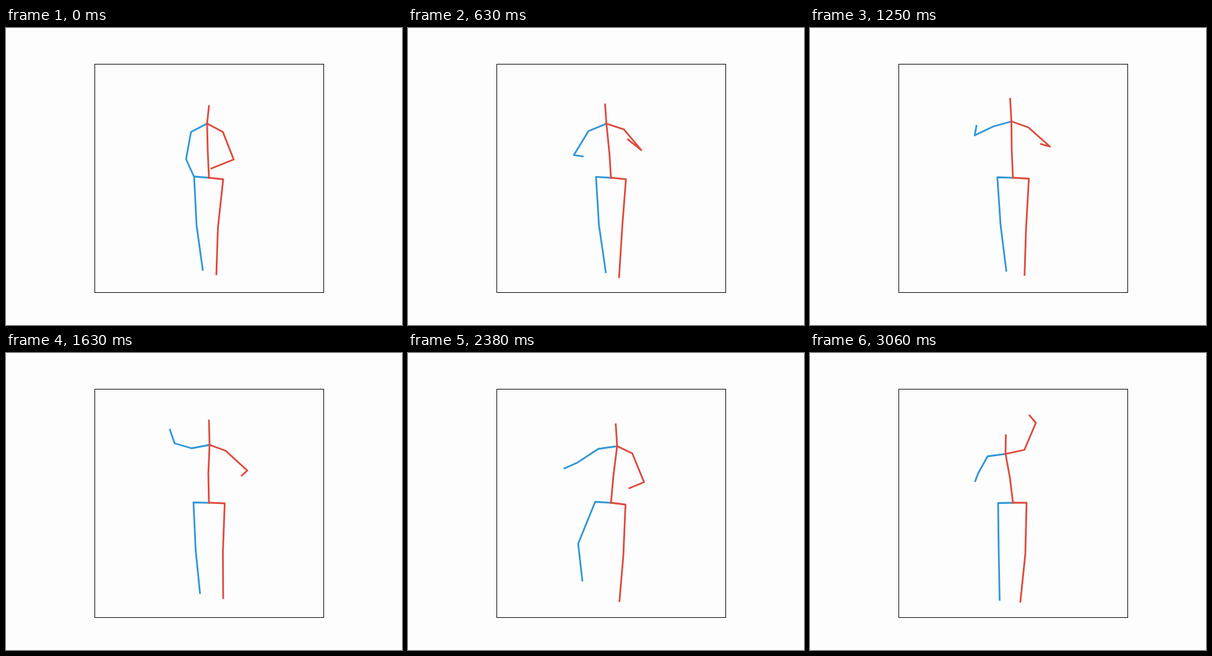
An HTML page for the animation above (3.12 s loop, 640 by 480 pixels).

```html
<!DOCTYPE html>
<html lang="en">
<head>
<meta charset="utf-8">
<title>Stick figure motion</title>
<style>
html, body { margin: 0; width: 100%; height: 100%; overflow: hidden; background: #fdfdfd; }
svg { display: block; width: 640px; height: 480px; }
.frame { fill: none; stroke: #000; stroke-width: 1; shape-rendering: crispEdges; }
.limb {
  fill: none; stroke-width: 2.8; stroke-linecap: square; stroke-linejoin: round;
  /* 50 poses per loop: each segment below steps once per pose */
  animation: 3120ms -4ms infinite;
}
.right { stroke: #3296d6; }
.left { stroke: #de4a3c; }
#trunk { animation-name: trunk; }
#left-arm { animation-name: left-arm; }
#left-leg { animation-name: left-leg; }
#right-arm { animation-name: right-arm; }
#right-leg { animation-name: right-leg; }

/* pelvis, spine, neck, head */
@keyframes trunk {
  0% { d: path("M328 242L326 198L325 154.5L328 126"); animation-timing-function: steps(5); }
  10% { d: path("M328 242L326 203L319 156L318 128"); animation-timing-function: steps(9); }
  28% { d: path("M328 242L325 200L322 153.5L319 120"); animation-timing-function: steps(12); }
  52% { d: path("M328 242L327 195L329 148.5L328 109"); animation-timing-function: steps(7); }
  66% { d: path("M328 242L335 195L346.5 150L341.5 113.5"); animation-timing-function: steps(10); }
  86% { d: path("M328 242L329.5 197L329.5 151L330 117"); animation-timing-function: steps(6); }
  98%, 100% { d: path("M328 242L323 201L316 163L316.5 133"); }
}
/* neck, shoulder, elbow, wrist */
@keyframes left-arm {
  0% { d: path("M325 154.5L350.5 168L368 212.5L332 227"); animation-timing-function: steps(5); }
  10% { d: path("M319 156L347 165L366 202L342.5 184.5"); animation-timing-function: steps(9); }
  28% { d: path("M322 153.5L350.5 163L386 193.5L366 177"); animation-timing-function: steps(12); }
  52% { d: path("M329 148.5L355 158L390 190L381 198"); animation-timing-function: steps(7); }
  66% { d: path("M346.5 150L371.5 165L381 218L366.5 239"); animation-timing-function: steps(10); }
  86% { d: path("M329.5 151L353.5 159.5L382 199.5L349 198"); animation-timing-function: steps(6); }
  98%, 100% { d: path("M316 163L346.5 156.5L365 113L355 101"); }
}
@keyframes right-arm {
  0% { d: path("M325 154.5L299 168L291 212L303 238.5"); animation-timing-function: steps(5); }
  10% { d: path("M319 156L291 169.5L278 211L294 226"); animation-timing-function: steps(9); }
  28% { d: path("M322 153.5L292 164.5L260 201L273 192.5"); animation-timing-function: steps(12); }
  52% { d: path("M329 148.5L300 154L272.5 146L265 124"); animation-timing-function: steps(7); }
  66% { d: path("M346.5 150L314 148.5L283 154.5L296 149.5"); animation-timing-function: steps(4); }
  74% { d: path("M339.7 150.4L308.8 153.7L271 172L246 178"); animation-timing-function: steps(6); }
  86% { d: path("M329.5 151L301 161.5L283 205.5L287 229"); animation-timing-function: steps(6); }
  98%, 100% { d: path("M316 163L287 167L272 194L267 207"); }
}
/* pelvis, hip, knee, foot */
@keyframes left-leg {
  0% { d: path("M328 242L351 244.5L342.5 323L340 398"); animation-timing-function: steps(5); }
  10% { d: path("M328 242L350 245L344 321L339.5 404"); animation-timing-function: steps(9); }
  28% { d: path("M328 242L354 244L348 323L342.5 402"); animation-timing-function: steps(12); }
  52% { d: path("M328 242L353.5 243L350.5 321L351 396"); animation-timing-function: steps(7); }
  66% { d: path("M328 242L352.5 245.5L344.5 326L332 400"); animation-timing-function: steps(10); }
  86% { d: path("M328 242L350.5 244.5L351.5 330L351.5 402"); animation-timing-function: steps(6); }
  98%, 100% { d: path("M328 242L350 242L348 325L340 402"); }
}
@keyframes right-leg {
  0% { d: path("M328 242L304 240L308 319L318 391"); animation-timing-function: steps(5); }
  10% { d: path("M328 242L305.5 240L307.5 318L318 392"); animation-timing-function: steps(9); }
  28% { d: path("M328 242L302.5 241L309.5 319L321 397"); animation-timing-function: steps(12); }
  52% { d: path("M328 242L303 241.5L306.5 318L313.5 388"); animation-timing-function: steps(7); }
  66% { d: path("M328 242L301.5 240L268 301.5L279.5 355"); animation-timing-function: steps(10); }
  86% { d: path("M328 242L303.5 241L282 315L284 380.5"); animation-timing-function: steps(6); }
  98%, 100% { d: path("M328 242L304 242.5L305 322L306.5 399"); }
}
</style>
</head>
<body>
<svg viewBox="0 0 640 480">
  <rect class="frame" x="143.5" y="58.5" width="370" height="369"/>
  <path class="limb right" id="right-leg"/>
  <path class="limb left" id="left-leg"/>
  <path class="limb right" id="right-arm"/>
  <path class="limb left" id="trunk"/>
  <path class="limb left" id="left-arm"/>
</svg>
</body>
</html>
```
